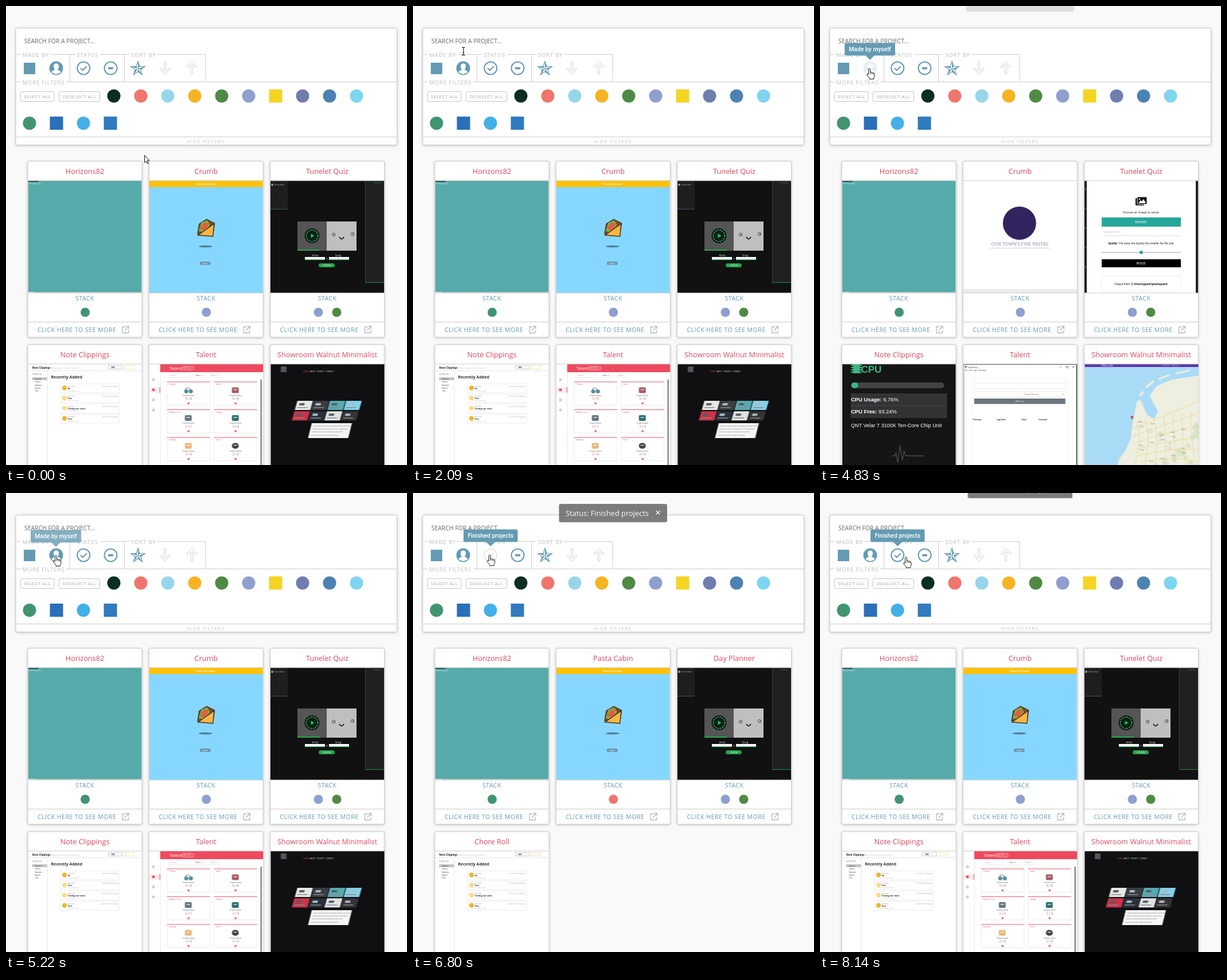
Write an HTML page that moves like this. It is 699 px wide and 801 px high and loops after 8220 ms.

```html
<!DOCTYPE html>
<html lang="en">
<head>
<meta charset="utf-8">
<title>Project filters</title>
<style>
html, body { margin: 0; width: 100%; height: 100%; overflow: hidden; background: #f9f9f9; }
#stage { display: block; width: 699px; height: 801px; }
text { font-family: 'Open Sans', sans-serif; white-space: pre; }
.ui { font-family: Roboto, sans-serif; }
.arial { font-family: 'Liberation Sans', sans-serif; }
.lato { font-family: Lato, sans-serif; }
.box { fill: #fff; stroke: #c9c9c9; filter: drop-shadow(0 1px 2px #0003); }
.rule { stroke: #ccc; fill: none; }
.label { font-size: 9.5px; letter-spacing: .85px; fill: #bdbdbd; }
.toast { transform-box: fill-box; transform-origin: center; }
</style>
</head>
<body>
<svg id="stage" viewBox="0 0 699 801"></svg>
<script>
const LOOP = 8220, BLUE = '#649bb3', RED = '#db4560';

// drawing helpers
const rect = (x, y, w, h, fill, more = '') => `<rect x="${x}" y="${y}" width="${w}" height="${h}" fill="${fill}" ${more}/>`;
const disc = (x, y, r, fill, more = '') => `<circle cx="${x}" cy="${y}" r="${r}" fill="${fill}" ${more}/>`;
const path = (d, fill = 'none', more = '') => `<path d="${d}" fill="${fill}" ${more}/>`;
const line = (d, color, width = 1) => path(d, 'none', `stroke="${color}" stroke-width="${width}"`);
const text = (x, y, size, fill, str, more = '') => `<text x="${x}" y="${y}" font-size="${size}" fill="${fill}" ${more}>${str}</text>`;
const MID = 'text-anchor="middle" ', BOLD = 'font-weight="700" ', UI = 'class="ui" ';
const frame = (x, y, w, h, color = '#ddd', more = '') => rect(x, y, w, h, '#fff', `stroke="${color}" stroke-width=".6" ${more}`);
const repeat = (n, fn) => Array.from({ length: n }, (_, i) => fn(i)).join('');

// technology badges: colour, then shape
const badges = {
  forest: ['#0b2e22'], coral: ['#f0756c'], ice: ['#97d6ea'], amber: ['#f7b322'],
  leaf: ['#4f8a45'], iris: ['#8f9fcf'], lemon: ['#f5d523', 'square'], slate: ['#6f7db0'],
  steel: ['#4c82b2'], sky: ['#7ed5f0'], green: ['#41946f'], cobalt: ['#2a70b8', 'square'],
  azure: ['#44b0e8'], navy: ['#307bbf', 'square']
};
function badge(name, x, y, size) {
  const [color, shape] = badges[name];
  return shape ? rect(x - size / 2, y - size / 2, size, size, color) : disc(x, y, size / 2, color);
}

// screenshots, 198 wide
const shots = {
  desktop: () => rect(0, 0, 198, 196, '#57aaaa') + rect(0, 0, 18, 2, '#27494c') +
    text(1, 6, 3, '#e8f4f4', 'Welcome guest') + rect(0, 194, 198, 2, '#b5cccc') + rect(0, 194, 12, 2, '#e2eded'),

  snack: () => rect(0, 0, 198, 196, '#86d7ff') + rect(0, 0, 198, 11, '#ffc107') +
    text(98, 7, 3.8, '#fff', 'Please the Crumb', MID + BOLD) +
    path('M84 93L87 75L100 67L114 74L111 96Z', '#7a4a24', 'stroke="#3f2d22"') +
    path('M86 88L91 73L101 69L106 77L95 90Z', '#74b64a') + path('M88 84L95 73L104 74L98 88Z', '#e0603f') +
    path('M85 95L113 75L111 97Z', '#f9b642', 'stroke="#3f2d22" stroke-width="1.3"') +
    '<ellipse cx="98" cy="114.5" rx="12" ry="1.8" fill="#4c7f98"/>' +
    rect(88, 141, 19, 6, '#6b98b0', 'rx="2.5"') + text(97.5, 145.6, 3.4, '#fff', 'PUSH', MID),

  quiz: () => rect(0, 0, 198, 196, '#111') + rect(0, 0, 30, 49, '#1e1e1e') + rect(0, 49, 30, 1, '#3a5560') +
    disc(3, 7, 2, '#999') + text(7, 8, 3, '#bbb', 'Guest player') +
    rect(165, 0, 33, 177, '#202020') + line('M165.5 0V177', '#37424a') + rect(165, 177, 33, 1, '#1f8f45') +
    text(180, 5, 3, '#1f9f4b', 'Track List') +
    rect(47, 71, 51, 51, '#555') + rect(98, 71, 52, 51, '#bfbfbf') + rect(47, 120, 39, 2, '#1fae4f') +
    disc(72.5, 96, 13, '#161616') + disc(72.5, 96, 10, 'none', 'stroke="#1fae4f" stroke-width="2" stroke-dasharray="2.4 1.6"') +
    disc(72.5, 96, 6.5, '#0d2416') + path('M70.5 92.5V99.5L76.5 96Z', '#24c45c') +
    [[110, 94], [143, 93]].map(([x, y]) => disc(x, y, 2.6, '#eee', 'stroke="#333"') + disc(x + .5, y, 1, '#222')).join('') +
    line('M120 98Q124 105 128 98', '#222', 1.6) +
    text(78, 132, 4.5, '#ddd', 'Artist', MID) + text(118, 132, 4.5, '#ddd', 'Song', MID) +
    [60, 102].map(x => rect(x, 133, 35, 5, '#fff') + rect(x, 137.3, 35, 1, '#1fae4f')).join('') +
    line('M97 136H100', '#aaa') + rect(84, 144, 28, 7, '#25a24a', 'rx="3.5"') + text(98, 148.8, 3.4, '#fff', 'CONFIRM', MID),

  notes: () => rect(0, 0, 198, 196, '#fff') + text(7, 7.5, 4.4, '#222', 'Note Clippings', BOLD) +
    text(40, 7.5, 3.6, '#bbb', 'What do you want to look for') + frame(140, 2.5, 25, 6, '#aaa') + rect(145, 4, 6, 3, '#999') +
    frame(169, 2.5, 15, 6, '#f3d46a') + line('M0 11.5H198M33.5 11V196', '#e6e6e6') +
    text(7, 18.5, 3.2, '#777', 'SORTED BY') + rect(7, 23, 26, 5, '#c4c4c4') +
    ['Newest', 'Oldest', 'Random', 'Author', 'Title'].map((s, i) => text(12, 27 + i * 5.3, 3.2, '#444', s)).join('') +
    text(40, 25, 7, '#333', 'Recently Added', BOLD) +
    ['Vo', 'Test', 'Testing our state', 'Test'].map((s, i) => {
      const y = 34.5 + i * 17.7;
      return frame(57, y, 102, 15.5, '#e2e2e2') + disc(63.5, y + 7, 4.2, i % 3 ? '#f8dc86' : '#e9b92f') +
        text(69, y + 5, 2.6, '#999', 'some text') + text(69, y + 9, 3.7, '#222', s, BOLD) +
        text(69, y + 13, 2.6, '#bbb', 'no further notes') + text(157, y + 5, 2.6, '#aaa', 'Last edited one day ago', 'text-anchor="end"');
    }).join(''),

  talent: () => rect(0, 0, 198, 196, '#fff') + rect(0, 40, 19, 10, '#fdeef0') + rect(18, 40, 1.5, 10, '#ee4a5f') +
    repeat(4, i => rect(5, 25 + i * 17.6, 4.5, 4.5, i === 1 ? '#e64a5f' : '#c9cdd2', 'rx="1"')) + line('M19.5 14V196', '#e8e8e8') +
    rect(19, 0, 179, 14, '#ee4a5f') + text(35, 10, 8, '#fff', 'Talent') +
    frame(57, 4, 21, 6, '#fff', 'rx="3" fill-opacity="0"') + text(67.5, 8.2, 3.2, '#fff', 'Add New +', MID) +
    frame(34, 16.5, 36, 7) + text(37, 21.2, 3.2, '#aaa', 'Search') +
    frame(78, 16.5, 20, 7) + text(81, 21.2, 3.2, '#444', 'Filter  ▾') + frame(105, 16.5, 18, 7) + text(108, 21.2, 3.2, '#888', 'Sort  ▾') +
    [['Primary', '0/0', '#548f98'], ['Styles', '6/6', '#a35b62'], ['Markup, Lines', '0/1', '#67767e'],
     ['Storage', '3/3', '#2f6f70'], ['Scripting', '2/2', '#e8b87d'], ['Server', '2/2', '#3d4147']].map(([name, score, color], i) => {
      const x = 31 + i % 2 * 82, y = 30.5 + (i >> 1) * 48.5;
      return frame(x, y, 75, 41, '#ddd') + rect(x, y, 75, 1, '#ef6273') + text(x + 3, y + 5.5, 3.2, '#e05265', name) +
        (i ? rect(x + 31, y + 10, 12, 10, color, `rx="${i === 5 ? 5 : 2}"`) + rect(x + 34, y + 13, 6, 2, '#fff9')
           : disc(x + 33.5, y + 17, 3.6, color) + disc(x + 41.5, y + 17, 3.6, color) + line(`M${x + 32} ${y + 14}l3-4m5 4l-3-4`, '#345')) +
        text(x + 37.5, y + 25, 3.2, '#555', 'Projects done', MID) +
        text(x + 37.5, y + 31.5, 5.6, '#555', `<tspan fill="#e64a5f">${score[0]}</tspan> / ${score[2]}`, MID) + disc(x + 37.5, y + 38, 1.8, '#ee4a5f');
    }).join('') + rect(194, 27, 2, 169, '#666'),

  showcase: () => rect(0, 0, 198, 196, '#101012') + rect(18, 4, 10, 10, '#55555a') +
    text(57, 14, 3, '#eee', '<tspan fill="#ee4a5f">HOME</tspan>   ABOUT   PROJECTS   CONTACT') +
    '<g transform="translate(47 64) skewX(-16)">' +
    ['#e6e9e8', '#3b3d42', '#56abb0', '#86d0e9', '#cc3348', '#28303a', '#dfe3e2', '#363336'].map((c, i) => {
      const x = i % 4 * 28.4, y = (i >> 2) * 18.3;
      return rect(x, y, 27, 16, c) + rect(x + 5, y + 4, 9, 4, i % 2 ? '#a9bcc2' : '#545e62') + rect(x + 3, y + 11, 18, 1.5, '#8b898b');
    }).join('') + '</g><g transform="translate(72 103) skewX(-14)">' + rect(0, 0, 70, 26, '#f5f5f5') +
    ['Hello and welcome here, this page shows some of the', 'things that were made with care over several years.',
     'Feel free to look around and open any of the', 'tiles above to read a longer description.'].map((s, i) => text(4, 6 + i * 5.2, 2.6, '#555', s)).join('') + '</g>',

  clock: () => rect(0, 0, 198, 196, '#fdfdfd') + rect(9, 0, 161, 196, '#28323a') + rect(11, 0, 4, 196, '#0a0a0a') + rect(163, 0, 5, 196, '#0a0a0a') +
    rect(16, 0, 146, 196, 'url(#day)') + '<svg x="16" width="146" height="196">' + disc(73, 176, 60, 'url(#glow)') +
    [[5, 188, 24], [32, 186, 17], [58, 196, 23], [88, 196, 20], [112, 187, 18], [140, 183, 26]].map(([x, y, r]) =>
      `<ellipse cx="${x}" cy="${y}" rx="${r}" ry="${r * .55}" fill="#e9f5fc" filter="url(#soft)"/>`).join('') + '</svg>' +
    disc(72, 12, 2.4, '#fff') + path('M69.9 13L72 17.5L74.1 13Z', '#fff') + text(79, 15, 5, '#fff', 'Edit Location', UI) +
    text(89, 39.5, 11, '#fff', 'London', MID + UI) + text(89, 72, 24, '#fff', '2:45 PM', MID + UI) +
    rect(170, 0, 20, 74, '#dedede') + repeat(6, i => i % 2 ? disc(180, 3 + i * 12.5, 2, 'none', 'stroke="#888"') : rect(178, 1 + i * 12.5, 4, 4, '#999')),

  pasta: () => rect(0, 0, 198, 196, '#fff') + disc(98, 74, 29, '#33245f') +
    text(98.5, 113, 8, '#9a94a8', "OUR TOWN'S FINE PASTAS", MID + 'class="lato"') + line('M46 117.5H151', '#c7bdd3', .8) + rect(0, 189, 198, 7, '#ececec'),

  squash: () => rect(0, 0, 198, 196, '#fff') + rect(0, 0, 4, 196, '#20202a') + rect(194, 0, 4, 196, '#20202a') +
    repeat(5, i => rect(1, 13 + i * 34, 1.5, 3, '#a24549')) + rect(89, 30, 15, 13, '#111', 'rx="1.5"') +
    rect(92, 28, 17, 13, '#111', 'rx="1.5" stroke="#fff"') + path('M94 39L98 34L100 36L103 32L107 39Z', '#fff') + disc(96, 32, 1.2, '#fff') +
    text(98.5, 56.5, 5.4, '#333', 'Choose an image to resize', MID + UI) +
    rect(30, 64, 138, 16, '#26a69a') + text(98.5, 73.8, 5, '#fff', 'BROWSE', MID + UI) +
    text(33, 91, 6, '#c5c5c5', 'Upload File', UI) + line('M33 96H168', '#ccc', .7) +
    text(98.5, 111, 5, '#222', '<tspan font-weight="700">Quality:</tspan> The lower the Quality the smaller the file size', MID + UI + 'font-style="italic"') +
    line('M30 125H168', '#9ba6a8') + disc(99, 125, 3, '#26a69a') + rect(30, 137, 138, 14, '#000') +
    text(98.5, 146, 5, '#fff', 'RESIZE', MID + UI) + frame(30, 166, 138, 26) +
    text(98.5, 181.5, 5, '#222', 'Output Path: <tspan font-weight="700">C:\\Users\\guest\\pixelsquash</tspan>', MID + UI),

  gauge: () => rect(0, 0, 198, 196, '#151516') + rect(0, 0, 2, 196, '#050505') + rect(19, 0, 12, 16, '#3cb683') +
    repeat(4, i => rect(15.5, 1 + i * 4, 19, 2, '#3cb683')) + text(33, 15, 17, '#3cb683', 'CPU', 'class="arial" ' + BOLD) +
    rect(16, 32, 162, 10, '#434345', 'rx="5"') + rect(16, 32, 12, 10, '#3cb683', 'rx="5"') +
    rect(15, 51, 168, 43, '#333335') + line('M15 72.5H183', '#48484a') +
    text(15.5, 64.5, 9.4, '#fff', '<tspan font-weight="700">CPU Usage:</tspan> 6.76%', 'class="arial"') +
    text(15.5, 85.5, 9.4, '#fff', '<tspan font-weight="700">CPU Free:</tspan> 93.24%', 'class="arial"') +
    text(15.5, 110, 9.1, '#fff', 'QNT Velar 7 3100K Ten-Core Chip Unit', 'class="arial"') +
    line('M87 160H92L94 155L97 172L101 141L105 168L108 152L111 160H142', '#4c4c4f', 1.3),

  diary: () => rect(0, 0, 198, 196, '#fff') + line('M.5 196V.5H197.5V196', '#333') + rect(3, 3, 3, 3, '#3f6f9c') +
    text(8, 6.5, 3.6, '#222', 'FaultDiary') + line('M168 5H171M179.5 3.5h3v3h-3zM190.5 3.5l3 3m0-3l-3 3', '#333', .6) +
    text(3, 12.3, 3, '#333', 'File   Edit   Logs   Developer') + frame(15, 25, 168, 185, '#eee') +
    frame(19, 33.5, 159, 9.5) + frame(19, 47.5, 77, 9.5) + frame(103, 47.5, 75, 9.5) +
    text(107, 53.7, 3.8, '#666', 'Select Priority') + text(173, 53.7, 3.5, '#666', '▾') +
    rect(19, 60, 159, 9.5, '#6c757d') + text(98.5, 66.2, 3.8, '#fff', 'Add Log', MID) +
    [['Priority', 17], ['Log Text', 58], ['User', 102], ['Created', 131]].map(([s, x]) => text(x, 98, 3.8, '#222', s, BOLD)).join(''),

  map: () => rect(0, 0, 198, 196, '#a9dbf7') +
    path('M54 196L60 166L72 150L80 132L84 104L91 66L97 61L103 74L109 88L122 96L128 82L119 66L114 54L126 38L152 27L198 20V196Z', '#edefe0') +
    path('M96 53L101 46L104 50L98 57ZM106 39L120 28L122 31L109 42ZM128 25L148 17L149 20L130 28ZM158 15L184 9V12L160 18Z', '#e9eddc') +
    repeat(26, i => disc(96 + Math.abs(Math.sin(i * 7.3)) * 100, 100 + Math.abs(Math.sin(i * 3.7)) * 80, 3 + i % 4, i % 3 ? '#cfe3bd' : '#e2ddd0', 'opacity=".75"')) +
    repeat(7, i => line(`M${76 + i * 4} ${116 + i * 11}Q${130 + i * 5} ${94 + i * 13} 198 ${65 + i * 21}M${90 + i * 16} ${100 - i * 3}Q${105 + i * 13} 135 ${80 + i * 20} 196`, '#f3d37f', .8)) +
    repeat(16, i => text(94 + i * 37 % 92, 102 + i * 23 % 74, 3, '#777', 'Town')) +
    disc(83, 92, 2, '#cf3f38') + path('M81.2 93L83 97L84.8 93Z', '#cf3f38') +
    rect(0, 0, 198, 5, '#5f35ae') + text(30, 3.6, 5, '#fff', 'Way Lab') + text(134, 3, 3.5, '#ddd', 'Locations   Sign up'),

  planner: () => rect(0, 0, 198, 196, '#24272a') + '<g filter="url(#soft)">' +
    [[30, 30, 34, '#494c50'], [85, 75, 40, '#55585b'], [120, 35, 38, '#4d5053'], [55, 78, 30, '#5b5d60'], [160, 28, 30, '#343739'],
     [172, 100, 34, '#16181b'], [20, 125, 30, '#191b1e'], [130, 150, 50, '#111418'], [55, 172, 45, '#171a20'], [170, 135, 22, '#34373a']]
      .map(([x, y, r, c]) => disc(x, y, r, c)).join('') + '</g>' + line('M80 154Q140 150 198 176', '#32363b', 4) +
    rect(0, 0, 198, 7, '#fff') + disc(4, 2, 2, '#222') + disc(31, 2, 3, '#333') + text(43, 4, 3, '#444', 'some day, some month') + text(94, 3, 3, '#444', 'today') +
    text(98.5, 43, 4, '#fff', 'No Tasks Right now!', MID + BOLD) + rect(72, 50, 55, 4, '#8d90a8', 'rx="2"') +
    text(3, 77, 3, '#eee', 'LABELS') +
    [['#f6a11e', 80], ['#e2352f', 86], ['#343ca8', 92.5], ['#5cc0c4', 112], ['#8f8f9a', 118], ['#d59bc8', 124], ['#eee', 130]].map(([c, y]) => disc(8, y, 2.2, c)).join('') +
    rect(5, 97, 25, 5, '#8d108e') + text(18, 100.6, 3, '#fff', 'LATE TASK', MID) + rect(72, 96, 55, 15, '#8a098b') + rect(72, 111, 55, 16, '#15173b') +
    text(74, 100.5, 3, '#fff', 'Testing a longer task name') + text(59, 98, 3.5, '#ddd', '08:00') + text(59, 106, 3.5, '#ddd', '09:00') +
    [96, 104].map(y => disc(136, y, 2.3, 'none', 'stroke="#999" stroke-width=".8"')).join(''),

  chores: () => rect(0, 0, 198, 196, 'url(#fire)') + text(99, 31, 4.4, '#fff', 'Chore Roll', MID + BOLD) +
    rect(68, 37, 62, 7, '#fff') + text(70, 41.8, 3, '#bbb', 'Write a new thing to do') + rect(124, 37, 6, 7, '#f0848c') + text(127, 42, 5, '#fff', '+', MID) +
    rect(68, 47, 62, 6, '#fff') + text(70, 51.3, 3, '#333', 'test') + rect(118, 47, 6, 6, '#37b36b') + rect(124, 47, 6, 6, '#e8585f')
};

// each card: [title, screenshot, badges] for all, filtered by maker, filtered by status
const cards = [
  [['Horizons82', 'desktop', ['green']], ['Zone Clock', 'clock', ['azure']], ['Horizons82', 'desktop', ['green']]],
  [['Crumb', 'snack', ['iris']], ['Pasta Cabin', 'pasta', ['coral']], ['Pasta Cabin', 'pasta', ['coral']]],
  [['Tunelet Quiz', 'quiz', ['iris', 'leaf']], ['Pixel Squash', 'squash', ['ice']], ['Day Planner', 'planner', ['iris', 'leaf']]],
  [['Note Clippings', 'notes', ['green']], ['Gaugio', 'gauge', ['ice']], ['Chore Roll', 'chores', ['green']]],
  [['Talent', 'talent', ['iris']], ['FaultDiary', 'diary', ['ice']]],
  [['Showroom Walnut Minimalist', 'showcase', ['green']], ['Way Lab', 'map', ['green']]]
];
const textSpans = ['0-2950 4830-6480 7740-8220', '2950-4830', '6480-7740'];
const shotSpans = ['0-3500 4910-6950 7820-8220', '3500-4910', '6950-7820'];
const firstSpans = ['0-3500 4830-6950 7740-8220', '3500-4830', '6950-7740'];

function card(states, i) {
  const x = 38 + i % 3 * 211.25, y = 271 + (i > 2 ? 320 : 0);
  const spans = i ? shotSpans : firstSpans;
  return `<g transform="translate(${x} ${y})"><g ${i > 3 ? 'data-show="0-6480 7740-8220"' : ''}>
    <rect class="box" width="199" height="307" rx="2"/>
    ${states.map(([title, shot, stack], s) => `<g data-show="${textSpans[s]}">
      ${text(99.5, 21.5, 12.7, RED, title, MID)}
      ${stack.map((b, k) => badge(b, 100 + (k - (stack.length - 1) / 2) * 32, 263.5, 16)).join('')}</g>
      <svg data-show="${spans[s]}" x=".5" y="34" width="198" height="195.5">${shots[shot]()}</svg>`).join('')}
    <path class="rule" d="M0 33.8H199M0 229.8H199M0 280.5H199"/>
    ${text(99.5, 243, 10.5, BLUE, 'STACK', MID + 'letter-spacing=".5"')}
    ${text(17, 298, 10.5, BLUE, 'CLICK HERE TO SEE MORE', 'letter-spacing=".5"')}
    ${line('M170 289H165V299.5H175.5V294.5M171 288H176V293M176 288L169 295.5', '#b4b9bd', 1.3)}
  </g></g>`;
}

const gap = (x, y, w, str) => rect(x - 3, y - 8, w, 10, '#fff') + `<text class="label" x="${x}" y="${y}">${str}</text>`;
const person = 'M79.5 115.8Q80.5 112.5 85 111.5Q82.8 108.5 83 104.5Q83.5 100.3 87.5 100.3Q91.5 100.3 92 104.5Q92.2 108.5 90 111.5Q94.5 112.5 95.5 115.8Q87.5 121.5 79.5 115.8Z';
const tick = color => disc(135.2, 108.5, 11, 'none', `stroke="${color}" stroke-width="2"`) + line('M130 108.5L133.8 112.3L140.8 105.3', color, 2);
const star = (() => {
  const at = (k, r) => `${230 + r * Math.sin(k * Math.PI / 5)} ${109.5 - r * Math.cos(k * Math.PI / 5)}`;
  const outline = 'M' + Array.from({ length: 10 }, (_, k) => at(k, k % 2 ? 5 : 13)).join('L') + 'Z';
  return path(outline, '#fff', `stroke="${BLUE}" stroke-width="1.2"`) +
    repeat(5, k => path(`M230 109.5L${at(2 * k, 13)}L${at(2 * k + 1, 5)}Z`, BLUE));
})();
const arrow = 'M275.3 97V114L269.5 108L268 109.8L277 119.5L286 109.8L284.5 108L278.7 114V97Z';
const hand = 'M-1.5 10.5V1.5Q-1.5 0 0 0T1.5 1.5V6.6Q3.2 5.6 4.2 7.2Q5.8 6.4 6.8 8Q8.8 7.4 9 9.5V13Q9 15 7.6 16.5V18.5H.2V16.8L-4 12Q-5 9.8-3 9.4L-1.5 10.5Z';
const button = (x, w, str) => rect(x, 149.5, w, 17, '#fff', 'stroke="#c4c4c4" rx="2"') +
  text(x + w / 2, 160.8, 8, '#a5a5a5', str, MID + 'letter-spacing=".5"');
const tip = (id, x, y, w, str) => `<g id="${id}">${rect(x, y, w, 22, BLUE, 'rx="3"')}
  ${path(`M${x + w / 2 - 8} ${y + 21.5}h16l-8 8Z`, BLUE)}${text(x + w / 2, y + 14.8, 10.4, '#fff', str, MID + UI + 'font-weight="500"')}</g>`;

const stage = document.getElementById('stage');
stage.innerHTML = `<defs>
  <linearGradient id="day" x2="0" y2="1"><stop stop-color="#1484cb"/><stop offset=".65" stop-color="#1b8fd4"/><stop offset="1" stop-color="#6bbdea"/></linearGradient>
  <linearGradient id="fire"><stop stop-color="#f00"/><stop offset="1" stop-color="#ff0"/></linearGradient>
  <radialGradient id="glow"><stop stop-color="#fff"/><stop offset="1" stop-color="#7cc8f0" stop-opacity="0"/></radialGradient>
  <filter id="soft"><feGaussianBlur stdDeviation="5"/></filter></defs>
  ${rect(0, 0, 699, 801, '#f9f9f9')}
  <rect class="box" x="17" y="38.5" width="664.5" height="204" rx="3"/>
  <path class="rule" d="M17 84.5H348V132.5M111.5 84.5V132.5M206.5 84.5V132.5M17 132.5H681M17 228.5H681"/>
  ${text(32, 65, 10.4, '#686868', 'SEARCH FOR A PROJECT...')}
  ${gap(28.5, 88.5, 52, 'MADE BY')}${gap(123.5, 88.5, 44, 'STATUS')}${gap(218, 88.5, 48, 'SORT BY')}${gap(28.5, 137, 79, 'MORE FILTERS')}
  ${rect(31, 99, 20, 20, BLUE)}
  <g id="maker">${disc(87.5, 108.5, 12, BLUE)}${path(person, '#fff')}</g>
  <g id="makerOff">${disc(87.5, 108.5, 11.5, 'none', 'stroke="#ddd"')}${path(person, 'none', 'stroke="#ddd"')}</g>
  <g id="done">${tick(BLUE)}</g><g id="doneOff">${tick('#e6e6e6')}</g>
  ${disc(182.5, 108.5, 11, 'none', `stroke="${BLUE}" stroke-width="2"`)}${rect(178, 106.8, 9, 3.6, BLUE, 'rx="1"')}${star}
  ${line(arrow, '#d2d2d2')}<g transform="rotate(180 300.5 108)">${line(arrow, '#d2d2d2')}</g>
  ${button(25.5, 58.5, 'SELECT ALL')}${button(92.5, 71, 'DESELECT ALL')}
  ${Object.keys(badges).map((b, i) => badge(b, i < 10 ? 188 + i * 47 : 41 + (i - 10) * 47, i < 10 ? 157 : 204.5, 23)).join('')}
  ${text(348.5, 239, 8, '#c0c0c0', 'HIDE FILTERS', MID + 'letter-spacing="1.4"')}
  ${cards.map(card).join('')}
  <g id="toast" class="toast">${rect(254.5, 19, 188.5, 32, '#666', 'rx="3"')}${text(266, 39.5, 12.8, '#fff', 'Status: Finished projects')}${text(427, 39, 13, '#fff', '✕', MID)}</g>
  ${tip('makerTip', 43, 64.5, 88, 'Made by myself')}${tip('doneTip', 88, 63.5, 94.5, 'Finished projects')}
  <g id="pointer">
    <g data-show="0-2090">${path('M.5.5V13.2L3.4 10.5L5.4 15.2L7.4 14.3L5.4 9.8H9.2Z', '#fff', 'stroke="#111"')}</g>
    <g data-show="2090-2170">${line('M-3-7Q0-7 0-5.5Q0-7 3-7M0-5.5V5.5M-3 7Q0 7 0 5.5Q0 7 3 7M-1.5 2H1.5', '#222', 1.2)}</g>
    <g data-show="2170-8220">${path(hand, '#fff', 'stroke="#111"')}${line('M1.5 6.5V10M4.3 7.2V10.4M6.9 8V10.6', '#111', .8)}</g>
  </g>`;

// timeline
function play(el, steps, easing = 'linear') {
  const keys = steps.map(([ms, props]) => ({ ...props, offset: ms / LOOP, easing }));
  if (keys.at(-1).offset < 1) keys.push({ ...keys.at(-1), offset: 1 });
  el.animate(keys, { duration: LOOP, iterations: Infinity });
}
const byId = id => document.getElementById(id);
const fade = (id, ...steps) => play(byId(id), steps.map(([ms, opacity]) => [ms, { opacity }]));

for (const el of stage.querySelectorAll('[data-show]')) {
  const steps = [[0, { opacity: 0 }]];
  for (const span of el.dataset.show.split(' ')) {
    const [from, to] = span.split('-').map(Number);
    if (from === 0) steps[0] = [0, { opacity: 1 }]; else steps.push([from, { opacity: 1 }]);
    if (to < LOOP) steps.push([to, { opacity: 0 }]);
  }
  play(el, steps, 'steps(1, end)');
}

fade('maker', [0, 1], [2870, 1], [3110, 0], [4790, 0], [5060, 1]);
fade('makerOff', [0, 0], [2950, 0], [3350, 1], [4760, 1], [4825, .1], [4990, 0]);
fade('done', [0, 1], [6400, 1], [6640, 0], [7720, 0], [8060, 1]);
fade('doneOff', [0, 0], [6560, 0], [6800, 1], [7735, 1], [7740, .5], [7900, 0]);
fade('makerTip', [0, 0], [2200, 0], [2410, 1], [5180, 1], [5380, 0]);
fade('doneTip', [0, 0], [5420, 0], [5620, 1]);

const home = 'translateY(0) scale(1)', away = 'translateY(-41px) scale(.965)';
const pose = (ms, opacity, transform) => [ms, { opacity, transform }];
play(byId('toast'), [
  pose(0, 0, home), pose(4829, 0, home), pose(4830, .18, 'translateY(-41px) scale(1)'), pose(4910, 0, away),
  pose(6470, 0, home), pose(6640, .85, home), pose(6870, .85, home), pose(7030, .8, away), pose(7110, 0, away),
  pose(7739, 0, home), pose(7740, .06, home), pose(7900, .85, home), pose(8000, .85, home), pose(8140, .85, away), pose(8220, .85, away)
]);

const route = [[0, 241, 260], [1420, 241, 260], [2080, 88, 79], [2170, 88, 79], [2330, 72, 96], [2540, 72, 96], [2800, 86, 109],
  [5180, 86, 109], [5600, 131.5, 108], [6700, 131.5, 108], [7100, 147, 110], [7240, 147, 110], [7350, 150, 112]];
play(byId('pointer'), route.map(([ms, x, y]) => [ms, { transform: `translate(${x}px, ${y}px)` }]), 'ease-in-out');
</script>
</body>
</html>
```
